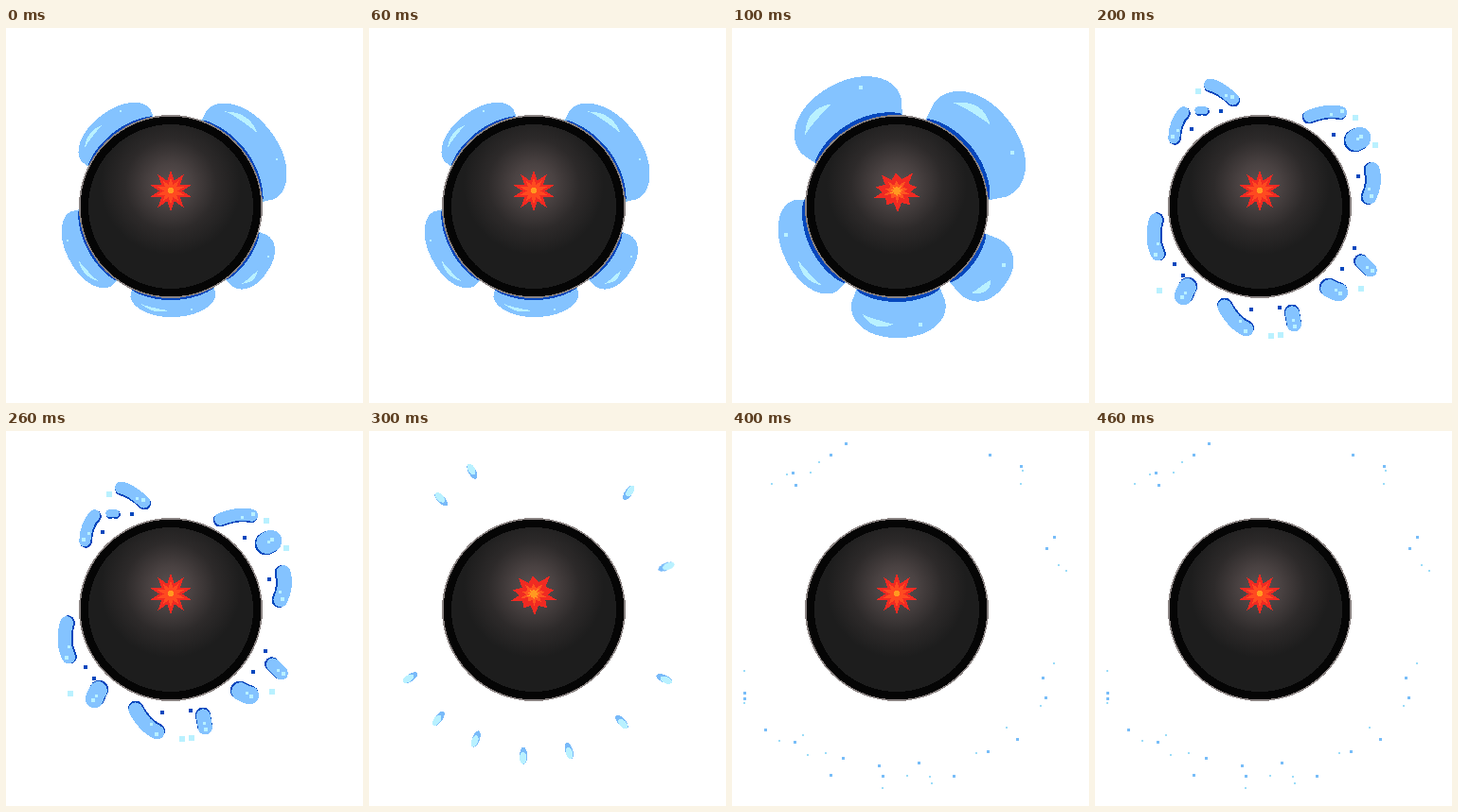
Animation, 377 px wide and 397 px high, one loop 0.5 s. Source, as an HTML page:

```html
<!DOCTYPE html>
<html lang="en">
<head>
<meta charset="utf-8">
<title>Splash</title>
<style>
  html, body { margin: 0; width: 100%; height: 100%; overflow: hidden; background: #fff; }
  svg { display: block; width: 377px; height: 397px; shape-rendering: crispEdges; }
</style>
</head>
<body>
<svg viewBox="0 0 377 397">
  <defs>
    <radialGradient id="glow" gradientUnits="userSpaceOnUse" cx="174" cy="166" r="74">
      <stop offset="0" stop-color="#5c5151"/>
      <stop offset=".3" stop-color="#4a4242"/>
      <stop offset=".65" stop-color="#2d2a2a"/>
      <stop offset="1" stop-color="#1d1d1d"/>
    </radialGradient>
  </defs>
  <g id="water"></g>
  <circle cx="174" cy="189" r="97" fill="#8a8382"/>
  <circle cx="174" cy="189" r="95.4" fill="#050505"/>
  <circle cx="174" cy="189" r="87" fill="url(#glow)"/>
  <g id="spark"></g>
</svg>
<script>
const STEP = 100, STEPS = 5;
const CX = 174, CY = 189, RADIUS = 97;
const BLUE = '#84c3ff', DARK = '#0547bd', PALE = '#b9f1ff';
const water = document.getElementById('water');
const spark = document.getElementById('spark');

function add(parent, tag, attrs) {
  const el = document.createElementNS('http://www.w3.org/2000/svg', tag);
  for (const k in attrs) el.setAttribute(k, attrs[k]);
  return parent.appendChild(el);
}

// Group that is visible only on the given steps
function layer(parent, ...on) {
  const keys = Array.from({ length: STEPS + 1 }, (_, i) => ({
    opacity: on.includes(i % STEPS) ? 1 : 0, offset: i / STEPS, easing: 'step-end'
  }));
  const g = add(parent, 'g', {});
  g.animate(keys, { duration: STEP * STEPS, iterations: Infinity }).startTime = 0;
  return g;
}

// Point at an angle in degrees around the disc
function polar(deg, r) {
  const a = deg * Math.PI / 180;
  return [CX + Math.cos(a) * r, CY + Math.sin(a) * r];
}

const poly = (g, points, fill) => add(g, 'polygon', { points: points.join(' '), fill });
const dot = (g, [x, y], s, fill) =>
  add(g, 'rect', { x: Math.round(x - s / 2), y: Math.round(y - s / 2), width: s, height: s, fill });

function random(seed) {
  return () => (seed = seed * 16807 % 2147483647) / 2147483647;
}

// Lobe between two angles; side (-1 or 1) tells where the highlight lies
function lobe(g, from, to, height, side, rim, dotSize) {
  const swell = u => Math.max(0, 1 - Math.abs(u) ** 2.5) ** 0.4;
  const at = (u, h) => polar((from + to) / 2 + u * (to - from) / 2, RADIUS + h * swell(u));
  const edge = (u0, u1, h) => Array.from({ length: 61 }, (_, i) => {
    const v = i / 60;
    return at(u0 + (u1 - u0) * v, h(v));
  });
  poly(g, [...edge(-1, 1, () => height), [CX, CY]], BLUE);
  poly(g, [...edge(-1, 1, () => rim), [CX, CY]], DARK);

  const a = side * 0.7, b = side * 0.1;
  const bow = k => v => height * (0.66 + k * Math.sin(Math.PI * v));
  poly(g, [...edge(a, b, bow(0.12)), ...edge(b, a, bow(-0.05))], PALE);
  dot(g, at(-side * 0.38, height * 0.75), dotSize, PALE);
}

const small = layer(water, 0);
[[206, 259, 24, -1], [-70.5, -3, 35, -1], [16, 53, 26, 1], [62, 115, 20, 1], [126, 178, 24, -1]]
  .forEach(a => lobe(small, ...a, 2, 2));

const full = layer(water, 1);
[[208, 273.5, 48, -1], [-71.5, -4, 52, -1], [17, 55, 44, 1], [62, 116, 42, 1], [124, 184.5, 33, -1]]
  .forEach(a => lobe(full, ...a, 4, 4));

// Free drop: a round line bowed outwards, dark towards the disc
function drop(g, x1, y1, x2, y2, width) {
  const mx = (x1 + x2) / 2, my = (y1 + y2) / 2;
  const d = Math.hypot(mx - CX, my - CY);
  const ox = (mx - CX) / d, oy = (my - CY) / d;
  const bend = Math.hypot(x2 - x1, y2 - y1) / 5;
  const line = (shift, stroke, w) => add(g, 'path', {
    d: `M${x1} ${y1}Q${mx + ox * bend} ${my + oy * bend} ${x2} ${y2}`,
    transform: `translate(${ox * shift} ${oy * shift})`,
    fill: 'none', stroke, 'stroke-width': w, 'stroke-linecap': 'round'
  });
  line(-0.5, DARK, width);
  line(1, BLUE, width - 1);
  if (width < 12) return;
  dot(g, [x2 + ox * 3, y2 + oy * 3], 4, PALE);
  dot(g, [x2 + (x1 - x2) * 0.3, y2 + (y1 - y2) * 0.3], 3, PALE);
}

const torn = layer(water, 2);
[
  [122, 61, 146, 76, 14], [94, 90, 84, 117, 13], [110, 88, 116, 88, 9],
  [226, 94, 259, 90, 14], [275, 119, 279, 117, 24], [292, 150, 289, 179, 16],
  [65, 203, 67, 239, 15], [98, 274, 94, 283, 20], [137, 294, 160, 318, 16],
  [208, 301, 210, 313, 16], [247, 275, 257, 279, 20], [281, 247, 290, 256, 15]
].forEach(a => drop(torn, ...a));
[24, 37, 79, 95, 138, 146, 229, 248, 316, 343].forEach(a => dot(torn, polar(a, 109), 4, DARK));
[39, 81, 85, 140, 242, 317, 332].forEach(a => dot(torn, polar(a, 138), 6, PALE));

// Droplets fly straight out, then each one breaks up into mist
const flying = layer(water, 3);
const mist = layer(water, 4);
const rnd = random(71);
const droplets = [
  [28, 156], [52, 151], [76, 154], [94, 155], [114, 150], [131, 153],
  [151, 149], [230, 152], [246, 160], [309, 159], [342, 147]
];
for (const [angle, r] of droplets) {
  const [x, y] = polar(angle, r);
  const g = add(flying, 'g', { transform: `translate(${x} ${y}) rotate(${angle - 5})` });
  add(g, 'ellipse', { rx: 9, ry: 4, fill: '#79baf9' });
  add(g, 'ellipse', { cx: 2.5, cy: 0.5, rx: 6.5, ry: 3.5, fill: PALE });
  for (let i = 0; i < 4; i++) {
    const p = polar(angle + (rnd() - 0.5) * 18, r * (1.05 + rnd() * 0.22));
    if (i % 2) dot(mist, p, 3, '#78bdf8');
    else dot(mist, p, 2, '#9bdcf8');
  }
}

// Spark: tips joined through notches, repeated smaller inside itself
function star(g, tips, notch, scale, fill) {
  const points = tips.flatMap(([x, y], i) => {
    const [nx, ny] = tips[(i + 1) % tips.length];
    return [[x, y], [(x + nx) / 2 * notch, (y + ny) / 2 * notch]];
  });
  poly(g, points.map(([x, y]) => [CX + x * scale, 172.5 + y * scale]), fill);
}

const regular = Array.from({ length: 10 }, (_, i) => {
  const a = i * Math.PI / 5;
  return [Math.sin(a) * 23.5, -Math.cos(a) * 22];
});
const ragged = [
  [1, 23], [-11, 15], [-25, 8], [-22, -4], [-16, -17],
  [-1, -19], [17, -19], [21, -4], [24, 6], [14, 15]
];

const even = layer(spark, 0, 2, 4);
star(even, regular, 0.54, 1, '#f02a22');
star(even, regular, 0.54, 0.62, '#ff4a20');
add(even, 'circle', { cx: CX, cy: 172, r: 3.3, fill: '#ff9a20' });

const odd = layer(spark, 1, 3);
star(odd, ragged, 0.65, 1, '#f02a22');
star(odd, ragged, 0.6, 0.55, '#ff5520');
star(odd, ragged, 0.6, 0.28, '#ff9a20');
</script>
</body>
</html>
```
